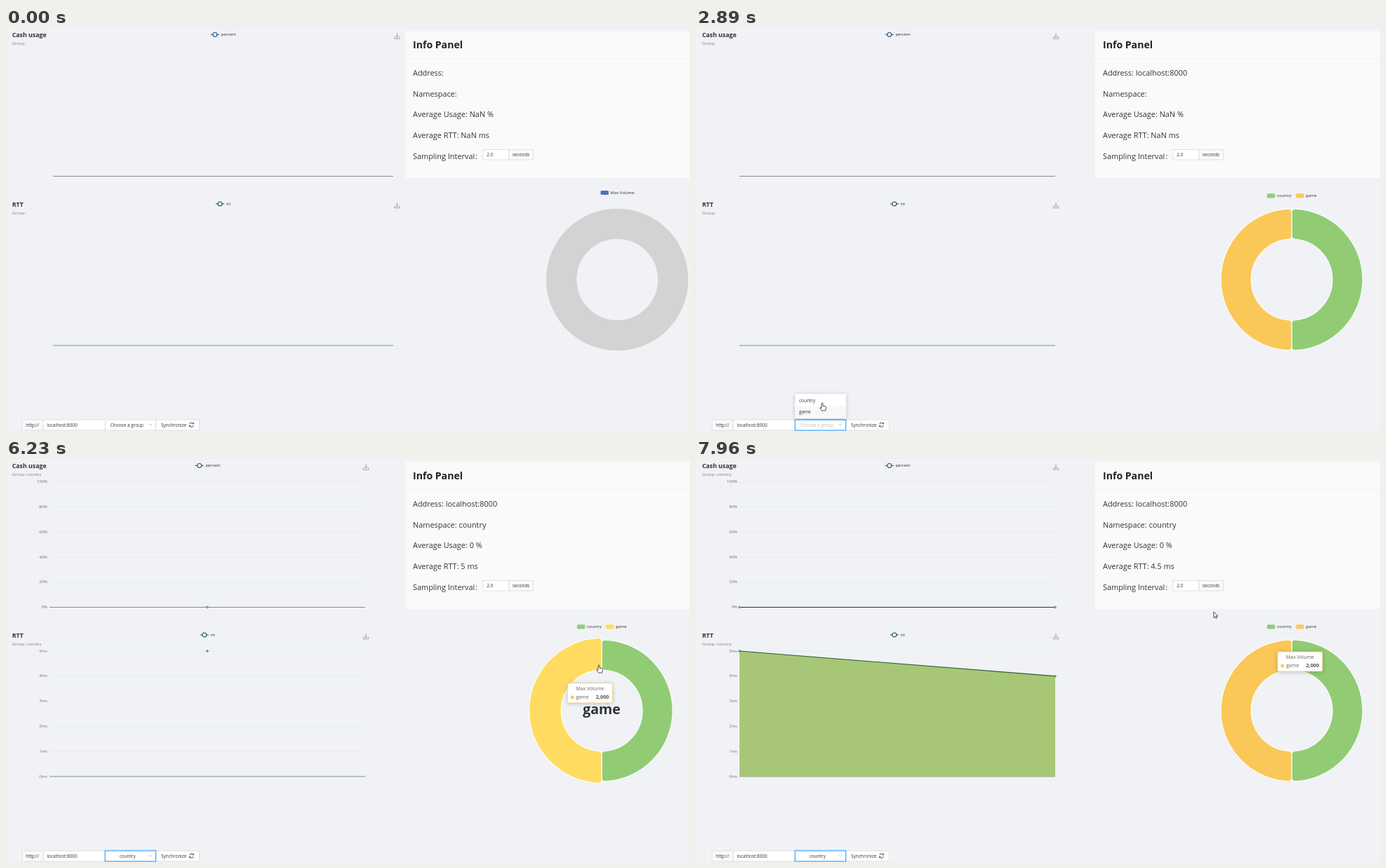
An HTML page for the animation above (8000 ms loop, 975 by 575 pixels).

```html
<!DOCTYPE html>
<html lang="en">
<head>
<meta charset="utf-8">
<title>Cache monitor</title>
<style>
  html, body { margin: 0; width: 100%; height: 100%; overflow: hidden; background: #f0f2f5; }
  svg { display: block; width: 975px; height: 575px; font-family: "Open Sans", "Noto Sans", sans-serif; }
  .drop { filter: drop-shadow(0 1px 3px rgba(0, 0, 0, .2)); }
</style>
</head>
<body>
<svg viewBox="0 0 975 575"><g id="base"></g><g id="live"></g></svg>
<script>
const LOOP = 8000, CY = 359;
const INK = '#333', AXIS = '#6e7079', EDGE = '#d9d9d9', BLUE = '#40a9ff';
const PERCENT = '#1d4f74', RTT = '#1f5a32';

// Moments of the story, in ms
const SYNC = 900, PIE = 960, OPEN = 2330, PICK = 2980, FIRST = 4750, SECOND = 6900;

const cursorPath = [
  [450, 240, 590], [700, 239, 567], [1920, 239, 567], [2200, 185, 566], [2450, 182, 566],
  [2690, 180, 547], [2820, 180, 535], [3540, 180, 535], [3790, 217, 531], [4050, 217, 531],
  [4540, 780, 361], [4890, 780, 361], [5150, 741, 352], [5300, 741, 350], [5600, 782, 336],
  [5950, 785, 330], [6230, 845, 294], [6510, 870, 290], [6800, 866, 286], [7400, 866, 286],
  [7640, 819, 267], [7890, 738, 218]];
const tipPath = [
  [4520, 800, 367], [4610, 798, 368], [4800, 789, 370], [4890, 789, 370], [5300, 765, 362],
  [5850, 790, 342], [6130, 792, 336], [6230, 800, 320], [6400, 858, 303], [6600, 876, 298],
  [6900, 874, 295], [7440, 874, 295], [7780, 829, 275]];
const gameGlow = [[4520, 0], [4820, 1], [5130, 1], [5400, 0], [5440, 0], [5720, 1], [6330, 1],
  [6630, 0], [7500, 0], [7620, .6], [7900, 0]];
const countryGlow = [[6330, 0], [6630, 1], [7500, 1], [7800, 0]];

const clamp = v => Math.max(0, Math.min(1, v));
const mix = (a, b, k) => a + (b - a) * k;
const linear = k => k;
const cubicOut = k => 1 - (1 - k) ** 3;
const cubicInOut = k => k < .5 ? 4 * k ** 3 : 1 - 4 * (1 - k) ** 3;
const span = (t, start, ms, ease = cubicInOut) => ease(clamp((t - start) / ms));
const within = (t, a, b) => t >= a && t < b;

function follow(track, t, ease = linear) {
  let i = track.findIndex(p => p[0] > t);
  if (i < 0) i = track.length;
  const a = track[Math.max(0, i - 1)], b = track[Math.min(i, track.length - 1)];
  const k = a === b ? 0 : ease((t - a[0]) / (b[0] - a[0]));
  return a.slice(1).map((v, n) => mix(v, b[n + 1], k));
}

const blend = (a, b, k) => `rgb(${a.map((v, i) => Math.round(mix(v, b[i], k)))})`;
const text = (x, y, s, size, fill = INK, more = '') =>
  `<text x="${x}" y="${y}" font-size="${size}" fill="${fill}" ${more}>${s}</text>`;
const rect = (x, y, w, h, fill, more = '') =>
  `<rect x="${x}" y="${y}" width="${w}" height="${h}" fill="${fill}" ${more}/>`;
const path = (d, stroke, width = 1, fill = 'none', more = '') =>
  `<path d="${d}" stroke="${stroke}" stroke-width="${width}" fill="${fill}" ${more}/>`;
const dot = (x, y, r, stroke, width = 1, fill = '#fff') =>
  `<circle cx="${x}" cy="${y}" r="${r}" stroke="${stroke}" stroke-width="${width}" fill="${fill}"/>`;
const framed = `stroke="${EDGE}" stroke-width=".8"`;
const bold = 'font-weight="700"', middle = 'text-anchor="middle"', end = 'text-anchor="end"';

// Ring segment with rounded corners; angles run clockwise from the top
function sector(cx, R, r, a0, a1, fill) {
  const c = Math.min(5, (a1 - a0) * r / 2);
  const p = (rad, a) => `${(cx + rad * Math.sin(a)).toFixed(2)} ${(CY - rad * Math.cos(a)).toFixed(2)}`;
  const o = c / R, n = c / r, big = a1 - a0 - 2 * o > Math.PI ? 1 : 0;
  return path(`M${p(R - c, a0)}Q${p(R, a0)} ${p(R, a0 + o)}A${R} ${R} 0 ${big} 1 ${p(R, a1 - o)}` +
    `Q${p(R, a1)} ${p(R - c, a1)}L${p(r + c, a1)}Q${p(r, a1)} ${p(r, a1 - n)}` +
    `A${r} ${r} 0 ${big} 0 ${p(r, a0 + n)}Q${p(r, a0)} ${p(r + c, a0)}Z`, '#fff', 1.1, fill);
}

function drawBase() {
  const rows = rect(569, 4.5, 406, 209.5, '#f9fbfb') + path('M569 43.3H975', '#eff0f1') +
    text(580, 29.3, 'Info Panel', 14.1, '#222', bold) +
    text(580, 186.5, 'Sampling Interval', 10.9) + text(669.3, 186.5, ':', 10.9);
  const interval = rect(680, 173.5, 37, 14.5, '#fff', framed) + rect(717, 173.5, 34.5, 14.5, '#fafafa', framed) +
    text(685.3, 183.2, '2.0', 6.4) + text(722, 183.2, 'seconds', 6.4);
  const titles = text(8.7, 13, 'Cash usage', 8.8, INK, bold) + text(8.7, 254.5, 'RTT', 8.8, INK, bold);
  const address = rect(23, 559, 30, 15, '#fafafa', framed) + rect(53, 559, 88.3, 15, '#fff', framed) +
    text(28.2, 568.8, 'http://', 6.45) + text(58.5, 568.8, 'localhost:8000', 6.4);
  return rows + interval + titles + address;
}

function chart(t, o) {
  const k = span(t, SYNC, 200), left = mix(67, 62, k), right = mix(552, 512, k);
  const lx = mix(o.legend, o.legend - 22.2, k), ix = mix(557.5, 513, k);
  const { top, ly, color } = o, bottom = top + 179, h = 179 / 5;
  let s = text(8.7, top - 8.3, 'Group:' + (t >= PICK ? ' country' : ''), 5.95, '#7a7a7a');
  s += path(`M${lx} ${ly}h12`, color, 1.1) + dot(lx + 6, ly, 2.9, color, 1.1) +
    text(lx + 14.7, ly + 2, o.name, 5.9);
  const iy = top - 21;
  s += path(`M${ix} ${iy - 4}v5.8M${ix - 2.2} ${iy - .4}l2.2 2.2 2.2-2.2M${ix - 3.7} ${iy + 1}v2.7h7.4v-2.7`, '#8b8b8b', .8);
  if (t >= FIRST) for (let i = 0; i <= 5; i++) {
    const y = bottom - i * h;
    if (i) s += path(`M${left} ${y}H${right}`, '#e5e9ef', .8);
    s += text(58.8, y + 1.6, o.label(i), 5.9, AXIS, end);
  }
  s += path(`M${left} ${bottom}H${right}`, AXIS, .8);
  if (t < FIRST) return s;

  const grow = 225 * span(t, SECOND + o.lag, 505), x0 = 287 - grow, x1 = 287 + grow;
  const y0 = bottom - o.data[0] * h, y1 = bottom - o.data[1] * h;
  if (t >= SECOND) {
    const line = `M${x0} ${y0}L${x1} ${y1}`;
    if (o.data[0]) s += path(`${line}V${bottom}H${x0}Z`, 'none', 0, '#a7c777');
    s += path(line, o.line, 1.1) + dot(512, y1, 1.2, color, .9);
  }
  return s + dot(x0, y0, 1.2, color, .9);
}

function panel(t) {
  const on = t >= FIRST, two = t >= SECOND;
  return ['Address:' + (t >= SYNC ? ' localhost:8000' : ''),
    'Namespace:' + (t >= PICK ? ' country' : ''),
    `Average Usage: ${on ? 0 : 'NaN'} %`,
    `Average RTT: ${two ? 4.5 : on ? 5 : 'NaN'} ms`
  ].map((s, i) => text(580, 68 + i * 29.6, s, 10.9)).join('');
}

function pie(t, game, country) {
  const swatch = (x, y, name, fill) =>
    rect(x, y - 3.1, 11.4, 6.2, fill, 'rx="1.6"') + text(x + 14, y + 1.9, name, 5.9);
  if (t < PIE) return swatch(847.6, 235, 'Max Volume', '#5470c6') +
    `<circle cx="871.3" cy="${CY}" r="79.6" fill="none" stroke="#d3d3d3" stroke-width="43.4"/>`;
  const sweep = Math.PI * Math.max(.02, span(t, PIE, 500));
  let s = swatch(814, 239.3, 'country', '#91cc75') +
    swatch(855.2, 239.3, 'game', blend([250, 200, 88], [255, 220, 97], game));
  s += sector(849.2, 101 + 2.6 * country, 58, 0, sweep, blend([145, 204, 117], [160, 224, 129], country));
  s += sector(849.2, 101 + 2.6 * game, 58, Math.PI, Math.PI + sweep, blend([250, 200, 88], [255, 220, 97], game));
  const hot = within(t, 6330, 7500) ? ['country', country]
    : within(t, 4520, 5130) || within(t, 5440, 6330) || within(t, 7500, 7620) ? ['game', game] : null;
  if (hot && hot[1] > .02)
    s += text(849, 357.2 + 6.6 * hot[1], hot[0], 19.6 * hot[1], '#2f3133', `${bold} ${middle}`);
  return s;
}

function tooltip(t) {
  if (t < 4520) return '';
  const [x, y] = follow(tipPath, t), country = within(t, 6330, 7500);
  const w = country ? 71 : 64, color = country ? '#91cc75' : '#fac858';
  return `<g class="drop">${rect(x, y, w, 28, '#fff', `rx="2" stroke="${color}" stroke-width=".6"`)}</g>` +
    text(x + w / 2, y + 10.3, 'Max Volume', 6.9, '#666', middle) +
    `<circle cx="${x + 7}" cy="${y + 20}" r="2.5" fill="${color}"/>` +
    text(x + 12.2, y + 22.2, country ? 'country' : 'game', 7, '#666') +
    text(x + w - 4.8, y + 22.2, '2,000', 7.3, '#555', `${bold} ${end}`);
}

function controls(t) {
  const focus = t >= OPEN, open = focus && t < PICK + 200, hover = within(t, 640, 2060);
  const tone = hover ? BLUE : INK, picked = t >= PICK;
  let s = rect(213.5, 559, 62, 15, '#fff', `stroke="${hover ? BLUE : EDGE}" stroke-width="${hover ? 1 : .8}"`);
  const wave = (t - SYNC) / 500;
  if (within(wave, 0, 1))
    s += rect(212.5, 558, 64, 17, 'none', `stroke="${BLUE}" stroke-width="2" opacity="${.35 * (1 - wave)}"`);
  s += text(221, 568.8, 'Synchronize', 6.45, tone);
  s += path('M261.7 565.3a2.9 2.9 0 0 1 5.3-.8M267.3 567.1a2.9 2.9 0 0 1-5.3 .8', tone, .9) +
    path('M267.8 562.8v2.5h-2.4ZM261.2 569.6v-2.5h2.4Z', 'none', 0, tone);
  if (focus) s += rect(141.3, 558.8, 72, 15.2, 'none', 'stroke="#1890ff" stroke-width="2.4" opacity=".22"');
  s += rect(141.3, 559, 72.2, 15, '#fff', `stroke="${focus ? BLUE : EDGE}" stroke-width="${focus ? 1.1 : .8}"`);
  s += picked ? text(173.2, 568.8, 'country', 6.45, INK, middle)
    : text(148.8, 568.8, 'Choose a group', 6.45, focus ? '#bfbfbf' : INK);
  s += path('M203.6 565l2.2 2.4 2.2-2.4', '#b5b5b5', .8);
  if (open) {
    const k = span(t, OPEN, 200, cubicOut) * (1 - span(t, PICK, 200));
    s += `<g opacity="${k}" transform="translate(0 ${557 * (1 - mix(.8, 1, k))}) scale(1 ${mix(.8, 1, k)})">` +
      `<g class="drop">${rect(141.3, 522, 72.4, 35, '#fff', 'rx="1"')}</g>` +
      rect(141.3, 539.5, 72.4, 15.5, '#f8f8f8') +
      text(147, 534.2, 'country', 6.45) + text(147, 549.7, 'game', 6.45) + '</g>';
  }
  return s;
}

function cursor(t) {
  const [x, y] = follow(cursorPath, t);
  const far = Math.hypot(x - 849.2, y - CY);
  const hand = t < 3650 || (far > 57 && far < 104);
  const d = hand
    ? 'M-1 1Q-1 0 0 0T1 1V4.2L4.7 5Q5.6 5.4 5.5 6.5L4.6 11H-.6L-3.2 7.4Q-3.4 5.8-1 7.2Z'
    : 'M0 0V8.6L2 6.8 3.3 9.6 4.6 9 3.3 6.2H6Z';
  return path(d, '#222', .8, '#fff', `stroke-linejoin="round" transform="translate(${x} ${y})"`);
}

const usage = { name: 'percent', legend: 291.9, ly: 9.4, top: 32.5, color: PERCENT, line: '#22302f',
  data: [0, 0], lag: 0, label: i => i * 20 + '%' };
const delay = { name: 'rtt', legend: 299, ly: 250.9, top: 274, color: RTT, line: '#245c2c',
  data: [5, 4], lag: 4, label: i => i + 'ms' };

const live = document.getElementById('live');
document.getElementById('base').innerHTML = drawBase();

function draw(now) {
  const t = now % LOOP;
  const [game] = follow(gameGlow, t, cubicOut), [country] = follow(countryGlow, t, cubicOut);
  live.innerHTML = chart(t, usage) + chart(t, delay) + panel(t) + pie(t, game, country) +
    controls(t) + tooltip(t) + cursor(t);
  requestAnimationFrame(draw);
}
draw(performance.now());
</script>
</body>
</html>
```
